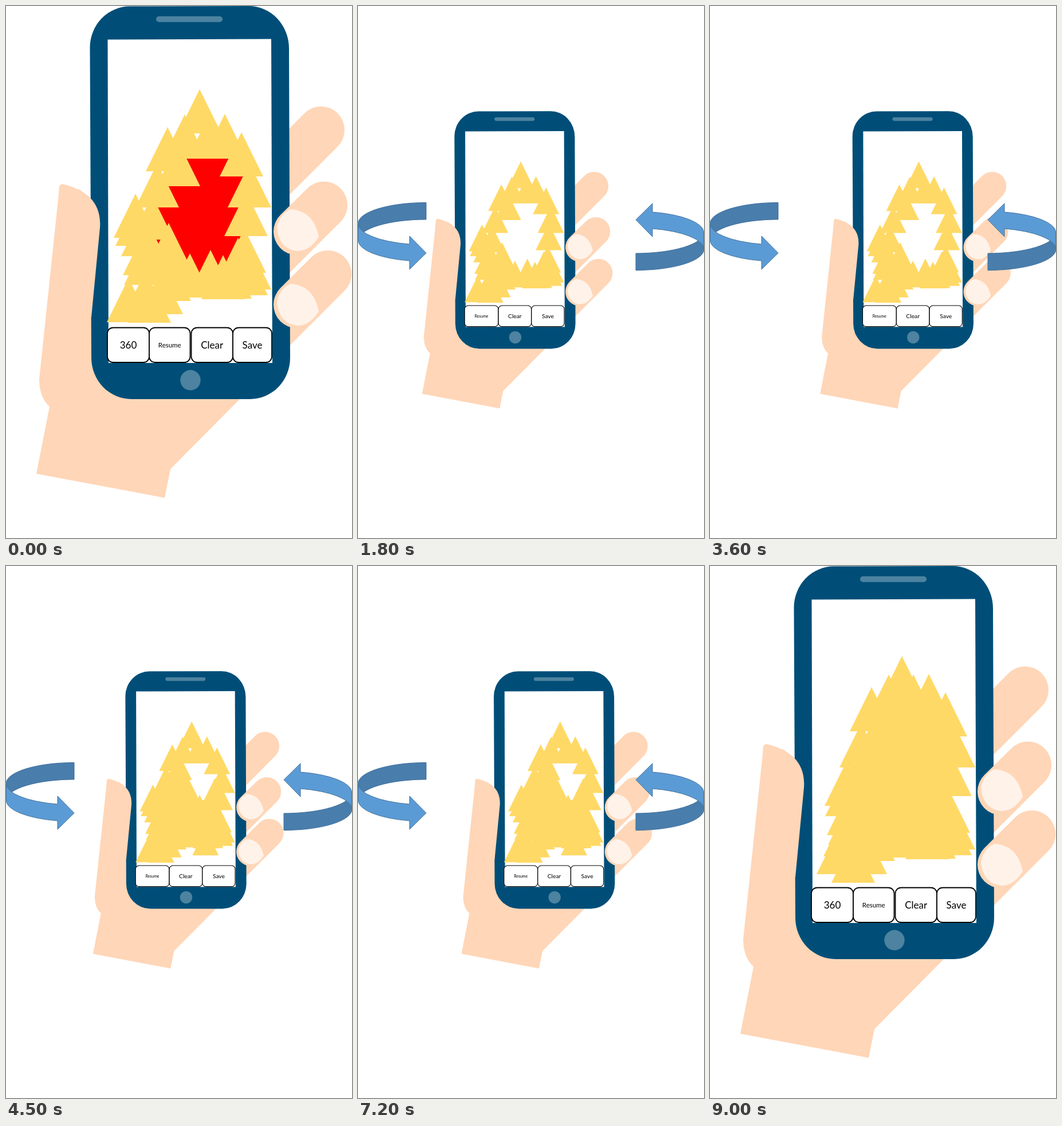
An HTML page that plays this animation: 604 by 927 pixels, repeating every 9.9 s.

```html
<!DOCTYPE html>
<html lang="en">
<head>
<meta charset="utf-8">
<title>Shake to fill</title>
<style>
  html, body { margin: 0; height: 100%; overflow: hidden; background: #fff; }
  svg { display: block; width: 100vw; height: 100vh; }
  text { font-family: Lato, Carlito, sans-serif; font-size: 17px; text-anchor: middle; }
  text.small { font-size: 11.5px; }
  .button { fill: #fff; stroke: #000; stroke-width: 1.8; }
  .skin { fill: #ffd6b7; }
  .finger { fill: none; stroke: #ffd6b7; stroke-width: 82; stroke-linecap: round; }
  .arrow { stroke: #41719c; stroke-width: 1; stroke-linejoin: round; }
</style>
</head>
<body>
<svg viewBox="0 0 604 927">
  <defs>
    <path id="nail" fill="#fff2e9" d="M473 387Q477 362 497 354Q537 357 546 402Q531 427 508 427Q477 423 473 387Z"/>
    <g id="arrow" class="arrow">
      <path fill="#497dac" d="M119 342.5A119 36.7 0 0 0 0 379V408A119 36.7 0 0 1 119 372Z"/>
      <path fill="#5b9bd5" d="M.5 379A119 36.7 0 0 0 90 415V401L119 430.5L90 459V444A119 36.7 0 0 1 .5 408Z"/>
    </g>
  </defs>

  <g id="hand">
    <path class="skin" d="M93 318L58 650Q58 682 76 698L53 815L277 857L287 807L419 674V500H149L130 320Z"/>
    <path class="finger" d="M550 216L450 316M555 347L460 442M562 467L460 569"/>
    <path fill="#004e78" d="M217 .5L424 0A70 74 0 0 1 494 74L496 613A70 72 0 0 1 426 685H219A70 72 0 0 1 149 613L146.5 73A70 72 0 0 1 217 .5Z"/>
    <rect x="262" y="18" width="116" height="10" rx="5" fill="#4d83a0"/>
    <circle cx="322" cy="652" r="17.7" fill="#4d83a0"/>
    <path fill="#fff" d="M177.500 58.500L463 57.500L465 622H179Z"/>
    <g id="tree"></g>
    <g id="buttons"></g>
    <path class="skin" d="M92.500 318Q93 308 102 311C140 321 167 342 164 386L149 542L90 545Z"/>
    <path class="finger" d="M555 347L508 393M562 467L508 520.500"/>
    <use href="#nail"/>
    <use href="#nail" y="130"/>
  </g>

  <g id="arrows">
    <use href="#arrow"/>
    <use href="#arrow" transform="rotate(180 302 401.5)"/>
  </g>
</svg>

<script>
const STEP = 900, SCALE = 0.6045;
const YELLOW = '#ffd966', RED = '#f00';
const $ = id => document.getElementById(id);

// A tree is painted with one triangular stamp; each point is the tip of a stamp.
const stamp = ([x, y]) => `M${x} ${y}l38 77h-76z`;

const ring = [
  [312, 189], [355, 189], [382, 188], [411, 220], [425, 274], [419, 324], // top and right
  [416, 388], [425, 417], [419, 427], [405, 404], [391, 433], [379, 434], // lower right
  [357, 425], [321, 431], [285, 437], [271, 460], [250, 475],             // bottom
  [244, 409], [242, 392], [239, 359], [297, 407], [284, 378],             // lower left
  [255, 330], [264, 274], [301, 237], [282, 211]                          // upper left
];
const first = [...ring, [338, 145], [226, 327], [229, 341], [214, 474], [238, 473]];

// Area behind the ring, and the part of it that the second drawing covers
const inside = 'M312 255H400L415 300V402L380 455L338 470L260 415V345L290 305Z';
const covered = 'M260 345L285 314H331L355 372H400L415 402L380 455L338 470L260 415Z';

const trees = {
  start: { tips: first, patch: '' },
  later: {
    tips: [...first, [325, 301], [361, 356], [405, 308], [241, 335], [224, 460], [378, 454]],
    patch: covered
  },
  done: { tips: [...ring, [335, 157], [238, 341], [236, 429], [224, 460]], patch: inside }
};

// Without x the phone is shown close up.
const shake = (tree, left, right) => [0, left, 0, right].map(x => ({ tree, x }));
const scenes = [
  { tree: 'start' },
  ...shake('start', -40, 40.3),
  ...shake('later', -34, 28.7),
  { tree: 'later' },
  { tree: 'done' }
];

const path = (d, fill) => `<path d="${d}" fill="${fill}"/>`;

function button(label, left, end) {
  const small = label === 'Resume';
  return `<rect class="button" x="${left}" y="560.5" width="${end - left}" height="60.5" rx="10"/>` +
    `<text class="${small ? 'small' : ''}" x="${(left + end) / 2}" y="${small ? 595 : 597}">${label}</text>`;
}

const closeButtons = button('360', 177, 250) + button('Resume', 250, 321.5) +
  button('Clear', 323.5, 396) + button('Save', 396, 464);
const farButtons = button('Resume', 176, 273) + button('Clear', 273.5, 368.5) + button('Save', 369, 463.5);

function show({ tree, x }) {
  const close = x === undefined;
  const { tips, patch } = trees[tree];
  $('hand').setAttribute('transform', close ? '' : `translate(${119.8 + x} 183.2) scale(${SCALE})`);
  $('arrows').style.display = close ? 'none' : '';
  $('buttons').innerHTML = close ? closeButtons : farButtons;
  $('tree').innerHTML = path(inside, close ? RED : 'none') + path(patch, YELLOW) +
    path(tips.map(stamp).join(''), YELLOW);
}

let shown = -1;
const begin = performance.now();

function tick() {
  const index = Math.floor((performance.now() - begin) / STEP) % scenes.length;
  if (index !== shown) show(scenes[shown = index]);
  requestAnimationFrame(tick);
}
tick();
</script>
</body>
</html>
```
